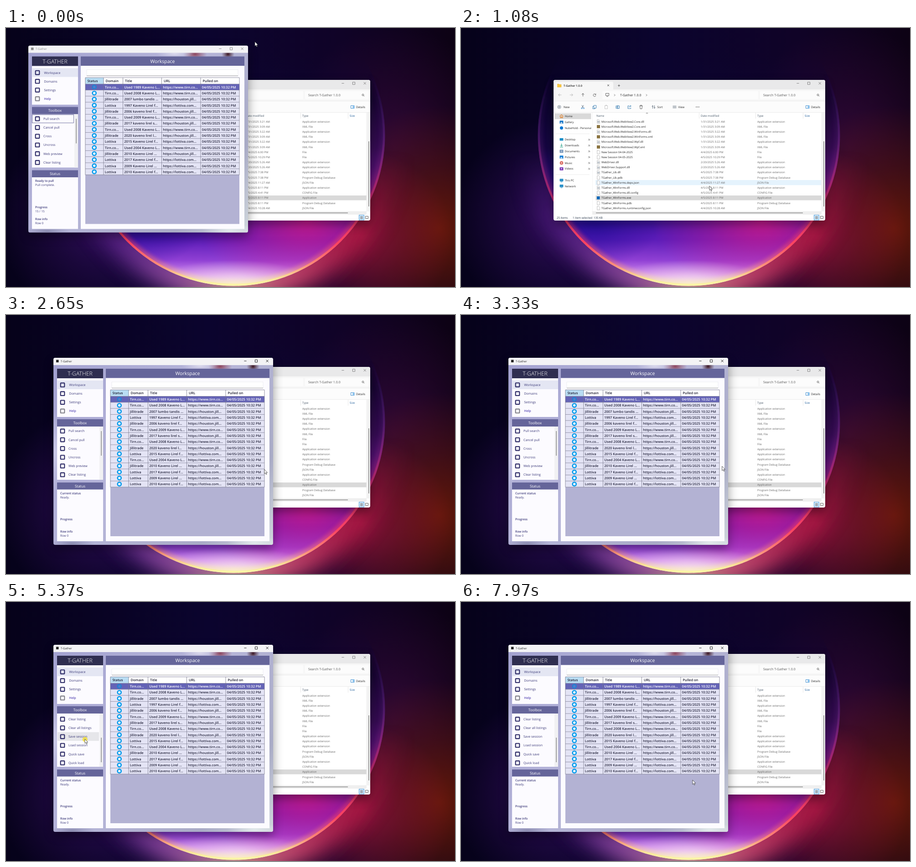
Recreate the animation shown at these times as an HTML page. Size 985 px wide and 569 px high, loop 8000 ms.

```html
<!DOCTYPE html>
<html lang="en">
<head>
<meta charset="utf-8">
<title>Saving a session</title>
<style>
html, body { margin: 0; width: 100%; height: 100%; overflow: hidden; background: #07021a; }
svg { display: block; width: 985px; height: 569px; font-family: "Open Sans", "Noto Sans", sans-serif; text-rendering: geometricPrecision; }
text { white-space: pre; }
</style>
</head>
<body>
<svg id="stage" viewBox="0 0 985 569"></svg>
<script>
const R = (x, y, w, h, fill, more = '') =>
  `<rect x="${x}" y="${y}" width="${w}" height="${h}" fill="${fill}" ${more}/>`;
const T = (x, y, s, size = 6.1, fill = '#222', more = '') =>
  `<text x="${x}" y="${y + size * .36}" font-size="${size}" fill="${fill}" ${more}>${s}</text>`;
const P = (d, stroke = '#444', w = .8, fill = 'none') =>
  `<path d="${d}" stroke="${stroke}" stroke-width="${w}" fill="${fill}"/>`;
const C = (x, y, r, fill, more = '') => `<circle cx="${x}" cy="${y}" r="${r}" fill="${fill}" ${more}/>`;
const G = (id, body, more = '') => `<g id="${id}" ${more}>${body}</g>`;
const clip = (id, body) => `<clipPath id="${id}">${body}</clipPath>`;
const shadow = (x, y, w, h) => R(x, y + 8, w, h, '#000', 'opacity=".4" filter="url(#soft)"');
const MID = 'text-anchor="middle"', SEMI = 'font-weight="600"';

let glows = 0;
function glow(x, y, rx, ry, color, o) {
  const id = 'glow' + glows++;
  const stop = (at, a) => `<stop offset="${at}" stop-color="${color}" stop-opacity="${a}"/>`;
  return `<radialGradient id="${id}">${stop(0, o)}${stop(.5, o * .45)}${stop(1, 0)}</radialGradient>
    <ellipse cx="${x}" cy="${y}" rx="${rx}" ry="${ry}" fill="url(#${id})"/>`;
}
function ramp(id, x1, y1, x2, y2, stops) {
  return `<linearGradient id="${id}" gradientUnits="userSpaceOnUse" x1="${x1}" y1="${y1}" x2="${x2}" y2="${y2}">` +
    stops.map(([at, c, a = 1]) => `<stop offset="${at}" stop-color="${c}" stop-opacity="${a}"/>`).join('') +
    '</linearGradient>';
}

// minimize, maximize, close
const buttons = (x, y) => P(`M${x - 2.6} ${y}h5.2M${x + 21.4} ${y - 2.6}h5.2v5.2h-5.2zM${x + 45.6} ${y - 2.6}l5.2 5.2m0-5.2l-5.2 5.2`, '#111', .9);
const chevron = (x, y) => P(`M${x - 1} ${y - 2}l2 2l-2 2`);
const down = (x, y) => P(`M${x - 2} ${y - 1}l2 2l2-2`);
const arrow = (x, y, turn, c = '#444') =>
  `<g transform="translate(${x} ${y}) rotate(${turn})">${P('M3.3 0h-6.6m2.8-2.8l-2.8 2.8l2.8 2.8', c)}</g>`;
const lens = (x, y) => C(x, y - .5, 1.9, 'none', 'stroke="#444" stroke-width=".8"') + P(`M${x + 1.4} ${y + .9}l1.8 1.8`);
const reload = (x, y) => P(`M${x + 2.5} ${y - 1.4}a2.9 2.9 0 1 0 .3 2.2M${x + 2.8} ${y - 3.2}v2.2h-2.2`);
const folder = (x, y) => P(`M${x - 4} ${y - 3.5}h3l1 1h4.5v6h-8.5z`, '#d9a520', .4, '#fbc942');
const page = (x, y) => P(`M${x - 2.8} ${y - 4}h4l1.8 1.8v6.2h-5.8z`, '#999', .6, '#fff');

function wallpaper() {
  return ramp('sky', 0, 0, 985, 0, [[0, '#06021a'], [.45, '#0b042e'], [.75, '#100327'], [1, '#0d0214']]) +
    ramp('ball', 0, 60, 0, 566, [[0, '#0b0430', 0], [.4, '#140640'], [.66, '#36109a'], [.8, '#5c1cb8'], [.89, '#9040d4'], [.95, '#d08af0'], [1, '#f4d8f0']]) +
    ramp('rim', 0, 100, 0, 566, [[0, '#502080', 0], [.3, '#7a2c90', .35], [.6, '#d82c68', .8], [.8, '#fb4460'], [.9, '#fd8c78'], [.97, '#f8e89c'], [1, '#fbf7a8']]) +
    ramp('halo1', 230, 300, 770, 300, [[0, '#7a30b0'], [.3, '#b060b0'], [.5, '#d8a090'], [.7, '#e85a80'], [1, '#d81c50']]) +
    ramp('fade', 0, 270, 0, 569, [[0, '#000'], [.4, '#444'], [.75, '#bbb'], [1, '#fff']]) +
    '<mask id="lower">' + R(0, 0, 985, 569, 'url(#fade)') + '</mask>' +
    clip('disc', C(500, 235, 331.5, '#fff')) +
    R(0, 0, 985, 569, 'url(#sky)') +
    glow(850, 260, 230, 270, '#3c0a3c', .75) + glow(950, 440, 260, 270, '#6c1a08', .9) +
    glow(780, 460, 200, 190, '#9c1440', .75) + glow(210, 420, 230, 220, '#4c1480', .6) +
    '<g mask="url(#lower)">' + C(500, 235, 331, 'none', 'stroke="url(#halo1)" stroke-width="70" opacity=".95" filter="url(#bloom)"') + '</g>' +
    '<g clip-path="url(#disc)">' + C(500, 235, 331.5, 'url(#ball)') +
    glow(290, 425, 150, 100, '#1a0a94', .75) + glow(660, 425, 240, 150, '#e01a86', .8) +
    glow(800, 330, 90, 170, '#8c1a80', .5) + glow(500, 560, 180, 50, '#fff0e8', .7) +
    C(500, 235, 328, 'none', 'stroke="url(#rim)" stroke-width="15" opacity=".5" filter="url(#haze)"') +
    C(500, 235, 329.3, 'none', 'stroke="url(#rim)" stroke-width="5"') + '</g>';
}

const files = [
  'Microsoft.Web.WebView2.Core.dll|1/31/2025 3:21 AM', 'Microsoft.Web.WebView2.Core.xml|1/31/2025 3:09 AM',
  'Microsoft.Web.WebView2.WinForms.dll|1/31/2025 3:22 AM', 'Microsoft.Web.WebView2.WinForms.xml|1/31/2025 3:09 AM',
  'Microsoft.Web.WebView2.Wpf.dll|1/31/2025 3:22 AM', 'Microsoft.Web.WebView2.Wpf.xml|1/31/2025 3:09 AM',
  'New Session 04-04-2025|4/4/2025 6:00 PM', 'New Session 04-05-2025|4/5/2025 10:29 PM',
  'WebDriver.dll|2/20/2025 5:26 AM', 'WebDriver.Support.dll|2/20/2025 5:26 AM',
  'TGather_Lib.dll|4/5/2025 7:38 PM', 'TGather_Lib.pdb|4/5/2025 7:38 PM',
  'TGather_WinForms.deps.json|4/4/2025 11:27 AM', 'TGather_WinForms.dll|4/5/2025 8:11 PM',
  'TGather_WinForms.dll.config|4/5/2025 4:41 PM', 'TGather_WinForms.exe|4/5/2025 8:11 PM',
  'TGather_WinForms.pdb|4/5/2025 8:11 PM', 'TGather_WinForms.runtimeconfig.json|4/4/2025 10:28 AM'];
const kinds = { dll: 'Application extension', xml: 'XML File', pdb: 'Program Debug Database',
  json: 'JSON File', config: 'CONFIG File', exe: 'Application' };
const ROW = 11.18, rowTop = i => 199.9 + ROW * i;

function fileRow(line, i) {
  const [name, date] = line.split('|'), y = rowTop(i) + ROW / 2, ext = name.split('.').pop();
  const icon = ext == 'xml' ? R(298, y - 3.5, 7, 7, '#8a7440') : ext == 'exe' ? R(298, y - 3.2, 6.5, 6.5, '#0a66b8')
    : page(301.5, y) + (ext == 'dll' ? C(301.5, y + .5, 1.5, 'none', 'stroke="#678" stroke-width=".9"') : '');
  return icon + T(308, y, name, 6.05) + T(526, y, date, 6.05, '#666') + T(650, y, kinds[ext] || 'File', 6.05, '#666');
}

// Places in the left pane, shared by the file window and the dialog
function places(x, y, gap, tail) {
  const pane = ['Home', 'Gallery', 'NubeHold - Personal', 'Desktop', 'Downloads', 'Documents', 'Pictures', 'Music', 'Videos', 'This PC', 'Network'];
  const tone = ['#e08a3c', '#1a78c8', '#0a78d4', '#1a8fc8', '#1a9a80', '#6f8fb4', '#1a80d8', '#d86a60', '#7a3ab8', '#2a90c8', '#2a90c8'];
  return pane.map((s, i) => {
    const py = y + 12.8 * i + (i > 2 ? gap : 0) + (i > 8 ? tail : 0), ix = x + 4.5, c = tone[i];
    const icon = i == 2 ? C(ix, py, 3.6, c)
      : i == 0 ? P(`M${ix - 4} ${py}l4-3.6l4 3.6M${ix - 2.6} ${py}v3.4h1.8v-2.4h1.6v2.4h1.8v-3.4`, c, 1.1)
      : i == 4 ? P(`M${ix} ${py - 4}v5.6m-2.6-2.4l2.6 2.6l2.6-2.6M${ix - 3.4} ${py + 3.6}h6.8`, c, 1)
      : i == 7 ? C(ix, py, 3.8, c) + C(ix, py, 1.2, '#fff')
      : R(ix - 4, py - 3.3, 8, i > 8 || i == 3 ? 5.6 : 6.8, c, 'rx=".8"') +
        (i == 8 ? P(`M${ix - 1} ${py - 1.8}v3.4l2.8-1.7z`, 'none', 0, '#fff')
        : i == 1 || i == 6 ? P(`M${ix - 3} ${py + 2.6}l2.6-3l3 3z`, 'none', 0, '#fff')
        : i == 5 ? P(`M${ix - 2} ${py - 1}h4m-4 2h4`, '#fff', .7)
        : i > 8 ? P(`M${ix - 2} ${py + 3.6}h4`, c, 1) : '');
    const pin = i > 2 && i < 9 ? P(`M${x + 63} ${py + 2.5}l2-2m-1.4-1.4l2.8 2.8m-1.6-3.8l2.4 2.4l-1.4.8l-1.6-1.6z`, '#777', .7) : '';
    return icon + T(x + 11.5, py, s) + pin;
  }).join('');
}

function explorer() {
  const w = 596, h = 309;
  return shadow(203, 114, w, h) + clip('exClip', R(203, 114, w, h, '#fff', 'rx="4"')) + '<g clip-path="url(#exClip)">' +
    R(203, 114, w, h, '#fff') + R(203, 114, w, 21.5, '#e9e9ea') + R(206, 118, 128, 20, '#f7f7f7', 'rx="3"') +
    R(203, 135, w, 25.5, '#f7f7f7') + R(310, 138.5, 342, 18, '#fcfcfc', 'rx="2"') + R(656, 138.5, 140, 18, '#fcfcfc', 'rx="2"') +
    R(203, 160.5, w, 25, '#fcfcfc') + P('M203 160.5h596M203 185.5h596', '#e4e4e4', .7) +
    folder(215.5, 126.5) + T(225, 126.5, 'T-Gather 1.0.0', 6.1, '#222', SEMI) +
    P('M321 124l4 4m0-4l-4 4M344 126.5h5m-2.5-2.5v5') + G('exButtons', buttons(739, 121.5)) +
    arrow(217, 147, 0, '#aaa') + arrow(242, 147, 180, '#aaa') + arrow(267.5, 147, 90) + reload(293, 147.5) +
    P('M317.5 143.5h7v5h-7zM319 150.5h4') + chevron(337, 147.5) + T(349, 147.5, 'T-Gather 1.0.0', 7.1) + chevron(407, 147.5) +
    T(663, 147.5, 'Search T-Gather 1.0.0', 7.1, '#555') + lens(783, 147.5) +
    C(215.5, 173.5, 3.5, 'none', 'stroke="#456" stroke-width=".7"') + P('M213.5 173.5h4m-2-2v4', '#456') + T(225, 173.5, 'New', 6.3) +
    P('M265 169.5l3.6 6m.4-6l-3.6 6', '#456') + C(265, 176.3, 1.2, 'none', 'stroke="#1a78c8" stroke-width=".8"') + C(269.4, 176.3, 1.2, 'none', 'stroke="#1a78c8" stroke-width=".8"') +
    P('M291.5 170h5v6h-5zM291 172h-2v5.5h5v-1.5M340 171h7.5v5.5h-7.5zM344 169.5v8.5M341.5 175l1-2.6l1 2.6M369 171h-3v6h6.5v-2M368.5 174.5q0-3 4.5-3m-2-2l2 2l-2 2', '#1a6aa8') +
    P('M315.5 170.5h6v7h-6zM317 169.5h3', '#bbb') + P('M391.5 171h7M392.5 171l.6 6.5h3.8l.6-6.5M393.8 171v-1.4h2.4v1.4') +
    P('M420.5 177v-6.5m-2 2l2-2l2 2M424.5 170v6.5m-2-2l2 2l2-2', '#456') + T(430.5, 173.5, 'Sort', 6.3) +
    P('M464.5 171.3h8m-8 2.2h8m-8 2.2h8', '#456', .7) + T(476.5, 173.5, 'View', 6.3) +
    [516, 519, 522].map(x => C(x, 173.5, .8, '#222')).join('') +
    P('M756.5 170.5h7.5v6h-7.5z', '#1a78c8') + R(760.5, 170.5, 3.5, 6, '#8cc4ee') + T(768, 173.5, 'Details', 6.3) +
    R(205, 187.5, 80.5, 12.7, '#d9d9d9') + places(216, 194, 12.8, 12.6) + P('M208 232.5h74M208 322h74M288 186v217', '#e2e2e2', .7) +
    R(285.6, 187, 2.4, 215, '#fff') +
    T(297, 192.5, 'Name', 6.1, '#456') + T(526, 192.5, 'Date modified', 6.1, '#456') + T(650, 192.5, 'Type', 6.1, '#456') + T(754, 192.5, 'Size', 6.1, '#1a5a98') +
    P('M522.5 186v13M646.5 186v13M750.5 186v13', '#ddd', .7) + P('M406 188l2-1.6l2 1.6') +
    R(295, 0, 495.5, ROW, '#e5f3fd', 'id="hoverRow"') + R(295.4, rowTop(15) + .3, 497, ROW - .6, '#d9d9d9', 'id="pickedRow" stroke-width=".9"') +
    files.map(fileRow).join('') +
    R(790.5, 186, 8.5, 217, '#f3f3f3') + R(795.2, 249, 1.3, 143, '#777') + R(288, 402.5, 503, 7.5, '#efefef') + R(296, 405.6, 454, 1.2, '#777') +
    T(210, 416.8, '25 items', 6.1, '#234') + T(245, 416.8, '1 item selected  135 KB', 6.1, '#234') +
    R(774.5, 411, 11, 11, '#d6ebfb', 'stroke="#2a88d0" stroke-width=".8"') + P('M777 414.5h6m-6 2.2h6m-6 2.2h6M788.5 413.5h6v5h-6z') + '</g>';
}

const sites = { t: ['Tirn.co...', 'https://www.tirn.co...'], j: ['Jillitrade', 'https://houston.jill...'], l: ['Lottiva', 'https://lottiva.com...'] };
const listings = ['tUsed 1989 Kaveno L...', 'tUsed 2008 Kaveno L...', 'j2007 lumbo tandis ...', 'l1997 Kaveno Lirel f...', 'j2006 kaveno lirel f...',
  'tUsed 2009 Kaveno L...', 'j2017 kaveno lirel s...', 'tUsed 2008 Kaveno L...', 'j2020 kaveno lirel l...', 'l2015 Kaveno Lirel f...',
  'tUsed 2004 Kaveno L...', 'j2010 Kaveno Lirel ...', 'l2017 Kaveno Lirel f...', 'l2009 Kaveno Lirel ...', 'l2010 Kaveno Lirel f...'];
const tools = ['Pull search', 'Cancel pull', 'Cross', 'Uncross', 'Web preview', 'Clear listing', 'Clear all listings', 'Save session', 'Load session', 'Quick save', 'Quick load'];
const STEP = 19.2, INK = '#3b3978', BAR = '#65659a';
const box = (y, c = '#2d2b66') => R(119.7, y - 4.2, 8.6, 8.6, 'none', `rx=".8" stroke="${c}" stroke-width="2.1"`);
const band = (x, y, w, h, s, size) => R(x, y, w, h, BAR) + T(x + w / 2, y + h / 2, s, size, '#fff', MID);

function table() {
  const cols = [229, 269, 311.5, 396.5, 482, 567];
  const rows = listings.map((line, i) => {
    const y = 178.6 + 13.3 * i, m = y + 6.8, c = i ? '#26263e' : '#fff', [site, url] = sites[line[0]];
    return R(229, y, 338, 13.3, i ? '#e4e4f5' : '#6463b6') + P(`M229 ${y}h338`, '#85859a', .8) +
      C(248.7, m - .2, 4, i ? '#fff' : '#5a78c8', `stroke="${i ? '#0a9cec' : '#2380d0'}" stroke-width="2.7"`) +
      [site, line.slice(1), url, '04/05/2025 10:32 PM'].map((s, k) => T(cols[k + 1] + 2.7, m, s, 7.5, c, SEMI)).join('');
  }).join('');
  return R(229, 164.5, 338, 321.5, '#b3b2d3') + R(229, 164.5, 338, 14, '#fff') + R(229, 164.5, 40, 14, '#b9ddf3') +
    rows + P(cols.map(x => `M${x} 164.5v213.6`).join('') + 'M229 164.5h338M229 378.1h338', '#77778c', .8) +
    ['Status', 'Domain', 'Title', 'URL', 'Pulled on'].map((s, i) => T(cols[i] + 4.5, 171.5, s, 7.5, '#1c1c30', SEMI)).join('');
}

function appWindow() {
  return shadow(104, 94, 482, 411) + ramp('wall', 104, 110, 586, 505, [[0, '#a3a2d0'], [.45, '#b7b6da'], [.8, '#a9abc6'], [1, '#cfd6dc']]) +
    clip('appClip', R(104, 94, 482, 411, '#fff', 'rx="4"')) + '<g clip-path="url(#appClip)">' + R(104, 94, 482, 411, 'url(#wall)') +
    glow(470, 113, 26, 14, '#8a3a50', .9) + glow(542, 113, 14, 12, '#3a1420', 1) + glow(425, 112, 40, 9, '#e6e4f2', .8) + glow(108, 300, 14, 90, '#d8d8ee', .7) + glow(545, 500, 60, 14, '#e6eeee', .9) + glow(145, 502, 50, 10, '#77789c', .7) +
    R(104, 94, 482, 16, '#f3f3f5') + G('appTitle', R(110, 98.5, 5.5, 5.5, '#222') + T(120, 101.5, 'T-Gather', 6.1) + buttons(525, 101)) +
    R(112, 118, 101, 21, '#2f2e50') + T(162.5, 128.7, 'T-GATHER', 12.3, '#fff', MID + ' font-weight="300"') +
    R(112, 139, 101, 85, '#fcfbff') + R(113, 144, 100, 19, '#e4e6f3') +
    ['Workspace', 'Domains', 'Settings', 'Help'].map((s, i) => box(153.5 + 19.1 * i, i > 2 ? '#808088' : undefined) + T(138.5, 153.5 + 19.1 * i, s, 7, i > 2 ? '#2d1aa0' : INK)).join('') +
    band(112, 229, 101, 16, 'Toolbox', 8) + R(112, 245, 101, 117, '#fcfbff') + clip('toolClip', R(112, 245, 101, 117, '#fff')) +
    `<g clip-path="url(#toolClip)">` + R(113, 0, 91, STEP, '#e6e6ea', 'id="hoverTool"') +
    G('toolList', tools.map((s, i) => box(254.8 + STEP * i) + T(137, 254.8 + STEP * i, s, 7, INK)).join('')) + '</g>' +
    R(205, 245, 8, 117, '#f1f1f3') + R(208.4, 255, 1.3, 54, '#777', 'id="toolThumb"') +
    band(112, 368, 101, 15.5, 'Status', 8) + R(112, 383.5, 101, 113.5, '#fcfbff') +
    G('pulled', R(112.5, 246, 91, 18, 'none', 'stroke="#5a5a90" stroke-width=".8"') + T(119, 391.5, 'Ready to pull', 6.5, INK, SEMI) + T(119, 400.5, 'Pull complete.', 6.5, INK) + T(119, 458, '15 / 15', 6.5, INK)) +
    G('ready', T(119, 391.5, 'Current status', 6.5, INK, SEMI) + T(119, 400.5, 'Ready.', 6.5, INK)) +
    T(119, 448.8, 'Progress', 6.5, INK, SEMI) + T(119, 475.3, 'Row info', 6.5, INK, SEMI) + T(119, 484.3, 'Row 0', 6.5, INK) +
    band(219, 118, 359, 20.5, 'Workspace', 10.5) + R(219, 138.5, 359, 358.5, '#fcfbff') +
    R(232, 147, 332, 13.5, '#fff', 'stroke="#e0e0e6" stroke-width=".6"') + P('M232 160.5h332', '#888', .8) + table() + '</g>';
}

function saveDialog() {
  const x = 109, w = 501;
  return shadow(x, 111, w, 313) + clip('dlgClip', R(x, 111, w, 313.5, '#fff', 'rx="4"')) + '<g clip-path="url(#dlgClip)">' +
    R(x, 111, w, 314, '#fff') + R(x, 126, w, 28, '#fafafa') + R(x, 154, w, 18, '#f6f6f6') + R(x, 341, w, 53, '#f8f8f8') + R(x, 394, w, 31, '#f0f0f0') +
    R(114, 115, 5.5, 5.5, '#222') + T(124, 118, 'Save session') + P('M599.5 115.5l5 5m0-5l-5 5', '#111', .9) +
    arrow(119.5, 140.5, 0) + arrow(138, 140.5, 180) + down(154, 140.5) + arrow(170, 140.5, 90) +
    R(181.5, 132, 308, 17.5, '#fff', 'stroke="#ddd" stroke-width=".8"') + R(496.5, 132, 107, 17.5, '#fff', 'stroke="#ddd" stroke-width=".8"') +
    folder(190, 140.5) + chevron(199, 140.5) + T(205.5, 140.5, 'Desktop') + chevron(234.5, 140.5) + T(240.5, 140.5, 'T-Gather 1.0.0') + chevron(286, 140.5) + T(292.5, 140.5, 'Sessions') +
    down(460, 141) + reload(479.5, 140.5) + T(501, 140.5, 'Search Sessions', 6.1, '#666') + lens(596, 140.5) +
    T(118, 163.3, 'Organize', 6.1, '#234') + P('M146 162.3h4l-2 2.4z', 'none', 0, '#222') + T(166.5, 163.3, 'New folder', 6.1, '#234') +
    P('M561.5 161.3h6m-6 2h6m-6 2h6', '#333', 1) + P('M574 162.3h4l-2 2.4z', 'none', 0, '#222') + C(598, 163.3, 4, '#0a78d4') + T(598, 163.3, '?', 6, '#fff', MID + ' font-weight="700"') +
    T(203, 179, 'Name', 6.1, '#456') + T(341, 179, 'Date modified', 6.1, '#456') + T(418, 179, 'Type', 6.1, '#456') + T(482, 179, 'Size', 6.1, '#456') +
    P('M337.5 173v13M414.5 173v13M478.5 173v13M520.5 173v13', '#ddd', .7) + P('M266 174l2-1.6l2 1.6') +
    G('paneItems', clip('paneClip', R(109, 172, 74, 169, '#fff')) + '<g clip-path="url(#paneClip)">' + R(110, 174, 73, 12.7, '#d9d9d9') + places(122, 180.5, 12.7, 12.6) + '</g>' +
      [206, 321, 333.5].map(y => chevron(115.5, y)).join('') + P('M114 219h64M114 308.5h64', '#e2e2e2', .7) +
      R(186.3, 181, 1.3, 139, '#777') + T(402, 197.5, 'No items match your search.', 6.05, '#555', MID)) +
    R(183, 172, 8, 169, '#f0f0f0', 'opacity=".5"') +
    T(172, 353, 'File name:', 6.1, '#222', 'text-anchor="end"') + T(172, 366.5, 'Save as type:', 6.1, '#222', 'text-anchor="end"') +
    R(175.5, 347, 431.5, 11.8, '#fff', 'stroke="#2a80c8" stroke-width=".8"') + R(177, 348.7, 82.5, 8.4, '#0a64b0') + T(177.5, 352.9, 'New Session 04-05-2025.xssp', 6.1, '#fff') +
    R(175.5, 360.8, 431.5, 11.4, '#fff', 'id="typeBox" stroke="#9ab" stroke-width=".8"') + T(177, 366.5, 'T-Gather Session Files (*.xssp)') + down(602.5, 353) + down(602.5, 366.5) +
    P('M115.5 411l2-2l2 2') + T(124.5, 410, 'Hide Folders') +
    R(502, 402.5, 45, 12, '#fdfdfd', 'id="saveButton" rx="1.5" stroke="#0a6ac0" stroke-width="1"') + T(524.5, 408.5, 'Save', 6.1, '#222', MID) +
    R(555, 402.5, 45.5, 12, '#fdfdfd', 'rx="1.5" stroke="#ccc" stroke-width=".7"') + T(577.8, 408.5, 'Cancel', 6.1, '#222', MID) + '</g>';
}

const $ = id => document.getElementById(id);
const blur = (id, r, pad) => `<filter id="${id}" x="-${pad}%" y="-${pad}%" width="${100 + 2 * pad}%" height="${100 + 2 * pad}%"><feGaussianBlur stdDeviation="${r}"/></filter>`;
$('stage').innerHTML = blur('soft', 11, 20) + blur('haze', 4, 10) + blur('bloom', 24, 30) +
  wallpaper() + explorer() + G('app', appWindow()) + G('dialog', saveDialog()) +
  G('pointer', C(.3, .8, 5.6, '#f2dc28', 'id="halo" opacity=".75"') + P('M0 0v9.6l2.2-2l1.6 3.5l1.5-.7l-1.6-3.4h3z', '#222', .7, '#fff'));

// time, x, y
const path = [[0, 546, 30], [300, 548, 70], [840, 547, 262], [1080, 545, 347], [1680, 550, 369], [2120, 551, 369], [2160, 554, 354],
  [2890, 573, 332], [3330, 573, 332], [3530, 510, 378], [3710, 400, 405], [3890, 250, 345], [4000, 180, 296], [4090, 174, 309],
  [4890, 174, 309], [5130, 173, 301], [5700, 173, 301], [6250, 215, 325], [6530, 343, 367], [6900, 500, 393], [7050, 514, 395],
  [7150, 520, 405], [7600, 520, 405], [7930, 515, 400], [7970, 508, 391], [8000, 508, 391]];
const clamp = v => Math.max(0, Math.min(1, v));
const span = (t, a, b) => clamp((t - a) / (b - a));
const ease = p => 1 - (1 - p) ** 3;

function pointerAt(t) {
  const i = Math.max(1, path.findIndex(k => k[0] >= t));
  const [a, x, y] = path[i - 1], [b, u, v] = path[i], p = span(t, a, b);
  return [x + (u - x) * p, y + (v - y) * p];
}
function set(id, attrs) {
  for (const k in attrs) $(id).setAttribute(k, attrs[k]);
}
const show = (id, on) => set(id, { visibility: on ? 'inherit' : 'hidden' });
// Windows grow in and shrink out around their centre
function pop(id, p, cx, cy, dx = 0, dy = 0) {
  const s = .9 + .1 * p;
  set(id, { opacity: p, visibility: p ? 'visible' : 'hidden', transform: `translate(${cx + dx} ${cy + dy}) scale(${s}) translate(${-cx} ${-cy})` });
}

function render(t) {
  const [x, y] = pointerAt(t), [, lag] = pointerAt(Math.max(0, t - 20));
  set('pointer', { transform: `translate(${x} ${y})` });
  show('halo', t >= 1740 && t < 1960 || t >= 5370 && t < 5560 || t >= 7160 && t < 7340);

  const exActive = t >= 1760 && t < 2440, row = Math.floor((lag - rowTop(0)) / ROW);
  set('exButtons', { opacity: exActive ? 1 : .5 });
  set('pickedRow', exActive ? { fill: '#cce8ff', stroke: '#3c5468' } : { fill: '#d9d9d9', stroke: 'none' });
  show('hoverRow', t > 200 && t < 2440 && row >= 0 && row < files.length);
  set('hoverRow', { y: rowTop(row) });

  const first = t < 1200;
  if (first) pop('app', 1 - ease(span(t, 40, 260)), 345, 300, -55, -55.5);
  else pop('app', ease(span(t, 2440, 2680)), 345, 300);
  show('pulled', first);
  show('ready', !first);
  set('appTitle', { opacity: first || t >= 5720 && t < 7420 ? .5 : 1 });

  const scroll = first ? 0 : 93.5 * span(t, 4150, 4650), tool = Math.floor((lag - 245 + scroll) / STEP);
  set('toolList', { transform: `translate(0 ${-scroll})` });
  set('toolThumb', { y: 255 + scroll * .46 });
  show('hoverTool', t > 3900 && t < 5720 && x < 204);
  set('hoverTool', { y: 245 + tool * STEP - scroll });

  pop('dialog', ease(span(t, 5720, 5940)) * (1 - ease(span(t, 7400, 7600))), 359.5, 268);
  show('paneItems', t >= 6250 && t < 7600);
  set('typeBox', y > 360 && y < 373 ? { fill: '#e0f0fc', stroke: '#2a80c8' } : { fill: '#fff', stroke: '#9ab' });
  set('saveButton', { fill: t >= 7110 ? '#e0eef9' : '#fdfdfd' });
}

function frame() {
  render(performance.now() % 8000);
  requestAnimationFrame(frame);
}
frame();
</script>
</body>
</html>
```
